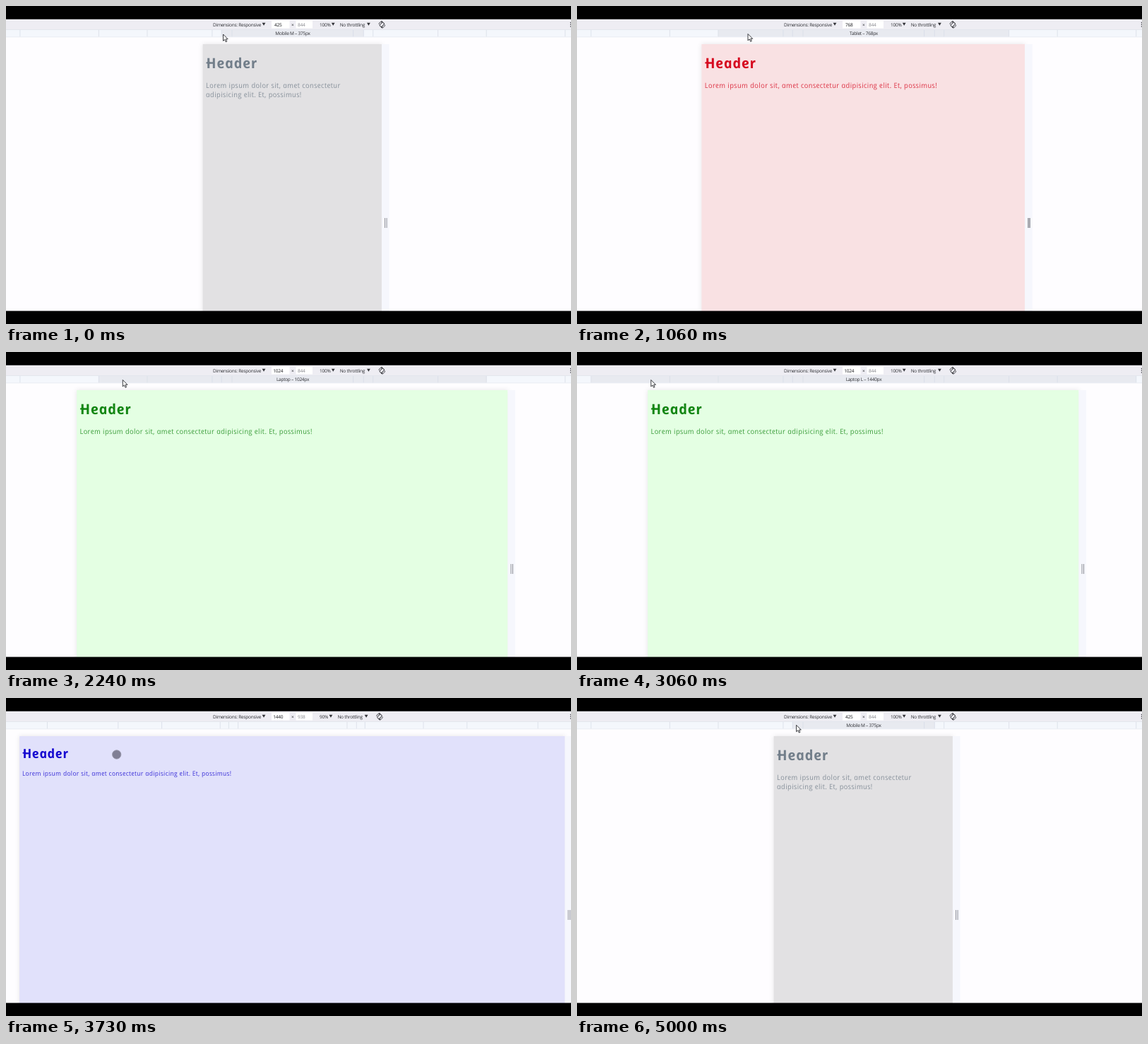
Write an HTML page that moves like this. It is 800 by 450 pixels and loops after 5030 ms.

```html
<!DOCTYPE html>
<html lang="en">
<head>
<meta charset="utf-8">
<title>Responsive preview</title>
<style>
  html, body { margin: 0; width: 100%; height: 100%; overflow: hidden; background: #000; }
  svg { display: block; width: 800px; height: 450px; }
  text { text-rendering: geometricPrecision; white-space: pre; font-family: "Open Sans", "Noto Sans", sans-serif; }
  .ui { font-size: 6.5px; letter-spacing: -.25px; fill: #2c2d32; }
  .value { fill: #17181c; }
  .muted { fill: #85868c; }
  .mid { text-anchor: middle; }
  /* Upright single-storey letters: italic glyphs with the slant taken out */
  .hand { font-style: italic; }
  .head { font-size: 20px; font-weight: 700; letter-spacing: .6px; }
  .body { font-size: 10.2px; letter-spacing: .265px; opacity: .76; }
  #page { filter: drop-shadow(0 0 3px rgba(0, 0, 0, .1)); }
</style>
</head>
<body>
<svg viewBox="0 0 800 450">
  <rect y="18" width="800" height="414" fill="#fefdff"/>

  <rect id="page" y="54" height="390"/>
  <rect id="strip" y="54" width="10.5" height="378" fill="#f6f7fd"/>
  <g id="content">
    <path d="M6 26.4H9.5" stroke="currentColor" stroke-width="2.4" stroke-linecap="round"/>
    <text class="hand head" transform="translate(6.2 34) skewX(12)" fill="currentColor">Header</text>
    <text class="hand body" id="line1" transform="translate(4.9 62) skewX(12)" fill="currentColor"></text>
    <text class="hand body" id="line2" transform="translate(4.9 74.5) skewX(12)" fill="currentColor"></text>
  </g>
  <g id="grip">
    <rect id="gripFill" x="4.6" y="300" width="2.6" height="14" fill="#b9bac0"/>
    <path d="M4.6 300V314M7.1 300V314" stroke="#8d8e96"/>
  </g>

  <rect y="34" width="800" height="9.5" fill="#f4f7fc"/>
  <rect id="hover" y="34" height="9.5" fill="#e8eaf0"/>
  <path id="ticks" stroke="#d9dee8" stroke-width=".8"/>
  <path d="M0 43.8H800" stroke="#e6e9f0" stroke-width=".8"/>
  <text class="ui mid" id="label" x="406" y="41.2"></text>

  <rect y="18" width="800" height="15.5" fill="#eeedf3"/>
  <path d="M0 33.5H800" stroke="#dfe2ea" stroke-width=".8"/>
  <rect x="376" y="21" width="25.5" height="10.5" fill="#fff"/>
  <rect x="410.5" y="21" width="23.5" height="10.5" fill="#fff"/>
  <text class="ui" x="293" y="28.6">Dimensions: Responsive</text>
  <path d="M362.6 23.8h4.8l-2.4 4z" fill="#303136"/>
  <text class="ui value mid" id="width" x="385.3" y="28.6"></text>
  <text class="ui mid" x="405.7" y="28.8">×</text>
  <text class="ui muted mid" id="height" x="418.3" y="28.6"></text>
  <text class="ui" id="zoom" x="444" y="28.6"></text>
  <g id="tools">
    <path d="M460.8 23.8h4.8l-2.4 4zM511 23.8h4.8l-2.4 4z" fill="#303136"/>
    <text class="ui" x="472.7" y="28.6">No throttling</text>
    <g transform="translate(532.3 26.3) scale(-1 1)" fill="none" stroke="#3c3d42" stroke-width=".95">
      <rect x="-1.9" y="-3.2" width="3.8" height="6.4" rx=".7" transform="rotate(-45)"/>
      <path d="M-.6 -4.3A4.4 4.4 0 0 1 4.3 -.4M.6 4.3A4.4 4.4 0 0 1 -4.3 .4M1.2 -4.8L-.8 -4.2L.6 -2.8M-1.2 4.8L.8 4.2L-.6 2.8"/>
    </g>
  </g>
  <g fill="#4a4b50">
    <circle cx="799.5" cy="23.6" r=".8"/>
    <circle cx="799.5" cy="26.3" r=".8"/>
    <circle cx="799.5" cy="29" r=".8"/>
  </g>

  <path id="arrow" d="M0 0V9.4L2.2 7.4L3.7 10.8L5.3 10.1L3.8 6.8H6.7Z" fill="#fff" stroke="#25262b" stroke-width=".9" stroke-linejoin="round"/>
  <circle id="touch" r="6.2" fill="#77768c" fill-opacity=".92" stroke="#9a99ab" stroke-width=".8"/>

  <path d="M0 0H800V18.7H0ZM0 431.4H800V450H0Z"/>
</svg>
<script>
  const LOOP = 5030, CENTER = 405.3, RULER_CENTER = 405.8;
  const $ = id => document.getElementById(id);
  const set = (el, attrs) => { for (const k in attrs) el.setAttribute(k, attrs[k]); };

  const presets = [
    [320, 'Mobile S'], [375, 'Mobile M'], [425, 'Mobile L'],
    [768, 'Tablet'], [1024, 'Laptop'], [1440, 'Laptop L']
  ];

  const small = { width: 425, zoom: 1, height: 844, bg: '#e2e1e3', ink: '#727e8a' };
  const views = [
    { at: 0, ...small },
    { at: 580, width: 768, zoom: 1, height: 844, bg: '#f9e1e3', ink: '#d60a20' },
    { at: 1990, width: 1024, zoom: 1, height: 844, bg: '#e4ffe3', ink: '#138613' },
    { at: 3180, width: 1440, zoom: .9, height: 938, bg: '#e1e1fb', ink: '#1508d0' },
    { at: 4820, ...small }
  ];

  // Pointer moves: start, end, from, to
  const moves = [
    [120, 420, [307.5, 40], [242, 39.5]],
    [1240, 1600, [242, 39.5], [165.3, 39.5]],
    [2300, 2690, [165.3, 39.5], [104.8, 39.5]],
    [3400, 3730, [104.8, 39.5], [156.7, 80]],
    [3850, 4330, [156.7, 80], [310.6, 38.3]]
  ];

  const ease = u => u * u * (3 - 2 * u);

  function pointer(t) {
    const [start, end, a, b] = moves.findLast(m => t >= m[0]) || moves[0];
    const u = ease(Math.min(1, Math.max(0, (t - start) / (end - start))));
    return a.map((v, i) => v + (b[i] - v) * u);
  }

  // Half the length a preset takes up on the ruler
  const half = (preset, zoom) => preset * .268 * zoom;

  let shown;
  function showView(v) {
    if (v === shown) return;
    shown = v;
    const w = v.width * .596 * v.zoom, x = CENTER - w / 2, right = x + w;
    set($('page'), { x, width: w, fill: v.bg });
    set($('strip'), { x: right });
    set($('grip'), { transform: `translate(${right} 0)` });
    set($('gripFill'), { visibility: v.width === 768 ? 'visible' : 'hidden' });
    set($('content'), { transform: `translate(${x} 54) scale(${v.zoom})`, color: v.ink });

    const lead = 'Lorem ipsum dolor sit, amet consectetur', rest = 'adipisicing elit. Et, possimus!';
    const wraps = v.width < 500;
    $('line1').textContent = wraps ? lead : lead + ' ' + rest;
    $('line2').textContent = wraps ? rest : '';

    $('width').textContent = v.width;
    $('height').textContent = v.height;
    $('zoom').textContent = v.zoom * 100 + '%';
    set($('tools'), { transform: `translate(${v.zoom < 1 ? -3.3 : 0} 0)` });
    const d = presets.map(([p]) => {
      const h = half(p, v.zoom);
      return `M${RULER_CENTER - h} 34v9.5M${RULER_CENTER + h} 34v9.5`;
    });
    set($('ticks'), { d: d.join('') });
  }

  function draw(t) {
    const v = views.findLast(s => t >= s.at);
    showView(v);

    const [x, y] = pointer(t);
    const onPage = y > 54;
    set($('arrow'), { transform: `translate(${x} ${y})`, visibility: onPage ? 'hidden' : 'visible' });
    set($('touch'), { cx: x, cy: y, visibility: onPage ? 'visible' : 'hidden' });

    const hit = y < 44 && presets.find(([p]) => Math.abs(x - RULER_CENTER) <= half(p, v.zoom));
    const h = hit ? half(hit[0], v.zoom) : 0;
    set($('hover'), { x: RULER_CENTER - h, width: 2 * h });
    $('label').textContent = hit ? `${hit[1]} – ${hit[0]}px` : '';
  }

  const begin = performance.now();
  function tick() {
    draw((performance.now() - begin) % LOOP);
    requestAnimationFrame(tick);
  }
  tick();
</script>
</body>
</html>
```
